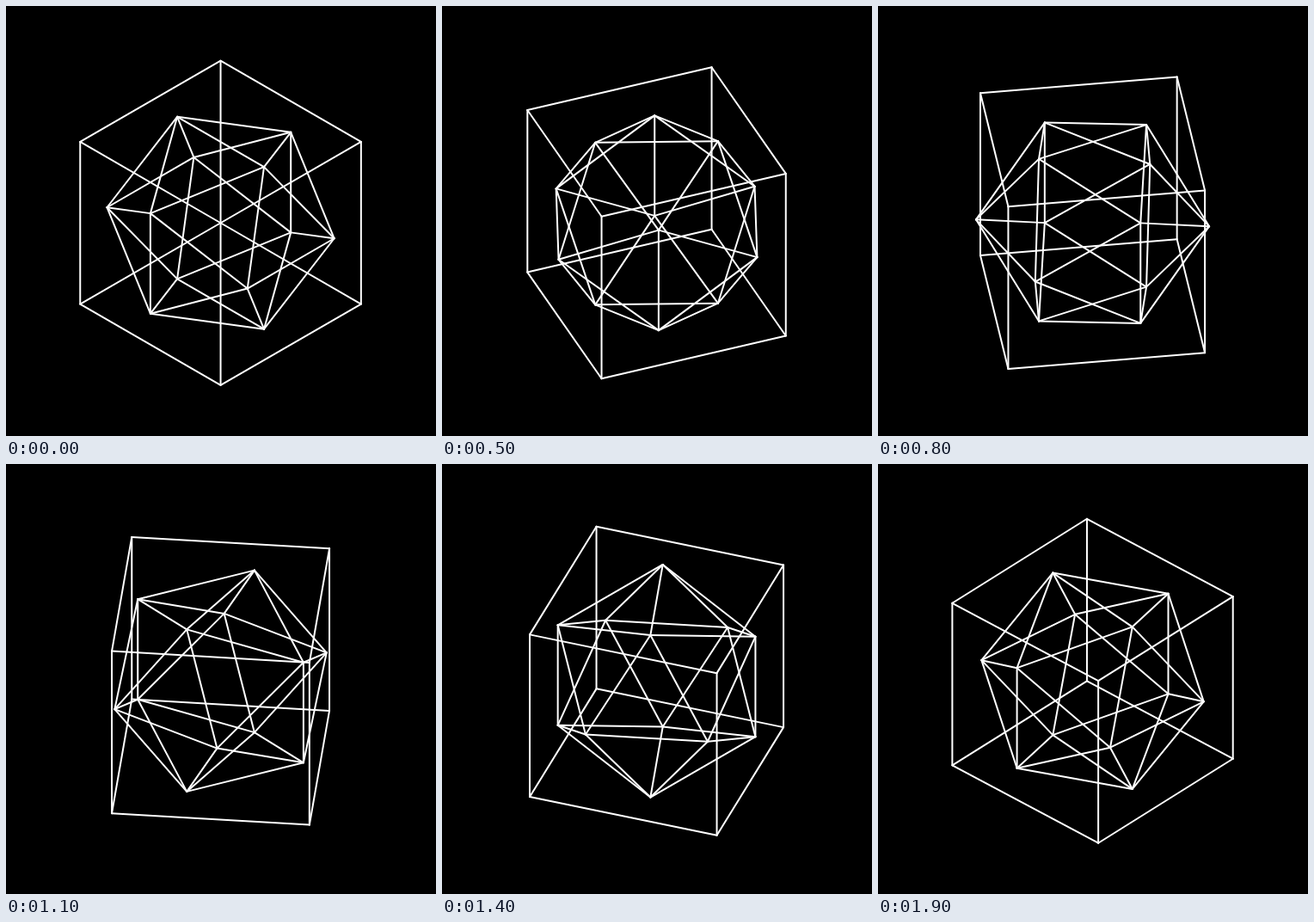
Recreate the animation shown at these times as an HTML page with a canvas. Size 500 px wide and 500 px high, loop 1.95 s.

```html
<!DOCTYPE html>
<html>
<head>
<meta charset="utf-8">
<style>
html, body { margin: 0; height: 100%; overflow: hidden; background: #000; }
canvas { display: block; }
</style>
</head>
<body>
<canvas width="500" height="500"></canvas>
<script>
const ctx = document.querySelector('canvas').getContext('2d');
const STEPS = 39, STEP_MS = 50;
const CX = 249.55, CY = 252.25;
const PHI = (1 + Math.sqrt(5)) / 2;
const HALF = 200 / Math.sqrt(3);
const SIGNS = [-1, 1];

// Vertices are [right, up, back]; edges join all pairs at the edge length.
function solid(points, edge) {
  const edges = [];
  points.forEach((p, i) => points.slice(0, i).forEach(q => {
    const length = Math.hypot(p[0] - q[0], p[1] - q[1], p[2] - q[2]);
    if (Math.abs(length - edge) < 0.1) edges.push([p, q]);
  }));
  return edges;
}

const pairs = SIGNS.flatMap(a => SIGNS.map(b => [a, b]));
const cube = solid(
  pairs.flatMap(([a, b]) => SIGNS.map(c => [a * HALF, b * HALF, c * HALF])),
  2 * HALF);
const unit = HALF / PHI;
const icosahedron = solid(
  pairs.flatMap(([a, b]) => {
    const s = a * unit, l = b * HALF;
    return [[0, s, l], [s, l, 0], [l, 0, s]];
  }),
  2 * unit);

// Isometric view after a turn about the vertical axis.
function project([x, y, z], turn) {
  const c = Math.cos(turn), s = Math.sin(turn);
  return [
    CX + x * c + z * s,
    CY - y * Math.sqrt(2 / 3) - (z * c - x * s) / Math.sqrt(3)
  ];
}

// Each edge is stroked on its own, so coinciding edges stay solid.
function draw(edges, turn) {
  for (const [p, q] of edges) {
    ctx.beginPath();
    ctx.moveTo(...project(p, turn));
    ctx.lineTo(...project(q, turn));
    ctx.stroke();
  }
}

function render() {
  const progress = Math.floor(performance.now() / STEP_MS) % STEPS / STEPS;
  ctx.fillStyle = '#000';
  ctx.fillRect(0, 0, 500, 500);
  ctx.strokeStyle = '#fff';
  ctx.lineWidth = 2;
  ctx.lineCap = 'round';
  draw(cube, Math.PI / 4 + progress * Math.PI / 2);
  draw(icosahedron, Math.PI / 4 - progress * Math.PI);
  requestAnimationFrame(render);
}
render();
</script>
</body>
</html>
```
